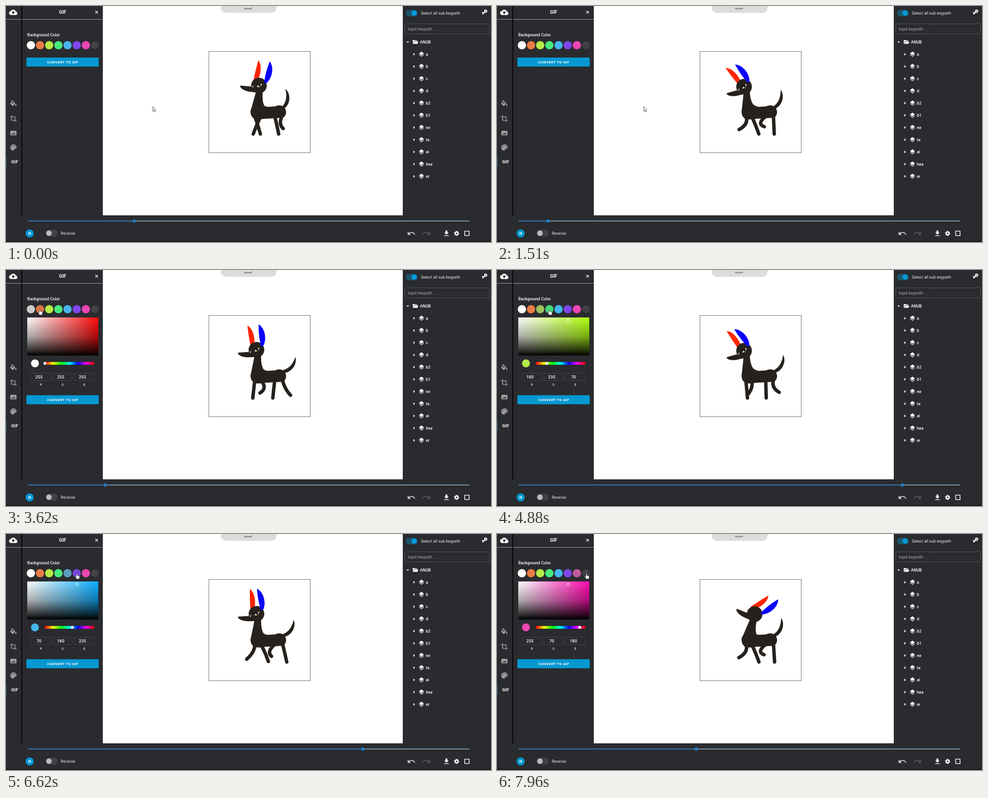
Animation, 1072 px wide and 522 px high, one loop 8 s. Source, as an HTML page:

```html
<!DOCTYPE html>
<html lang="en">
<head>
<meta charset="utf-8">
<title>Animation editor</title>
<style>
html, body { margin: 0; width: 100%; height: 100%; overflow: hidden; background: #2a2b2f; }
svg { display: block; width: 1072px; height: 522px; }
text { font: 9px Roboto, sans-serif; fill: #e6e6e6; }
.mid { text-anchor: middle; }
.bold { font-weight: 700; fill: #fff; }
.rows text, .medium { font-weight: 500; fill: #fff; }
.box { fill: none; stroke: #55575b; }
#fields .box { stroke: #424448; }
#legs path { fill: none; stroke: #26211d; stroke-width: 7.6; stroke-linecap: round; }
</style>
</head>
<body>
<svg viewBox="0 0 1072 522" xmlns="http://www.w3.org/2000/svg">
  <defs>
    <linearGradient id="tint"><stop stop-color="#fff"/><stop id="tintEnd" offset="1"/></linearGradient>
    <linearGradient id="shade" x2="0" y2="1">
      <stop stop-opacity="0"/><stop offset=".5" stop-opacity=".32"/><stop offset=".85" stop-opacity=".77"/><stop offset="1"/>
    </linearGradient>
    <linearGradient id="hues"></linearGradient>
  </defs>
  <rect width="1072" height="522" fill="#2a2b2f"/>
  <rect x="214" width="663" height="463" fill="#fff"/>
  <rect y="519" width="1072" height="3" fill="#211b20"/>
  <rect x="34" width="2" height="463" fill="#050505"/>
  <path d="M0 29.5H34M36 29.5H214" stroke="#a5a6a8"/>
  <path d="M475 0h123v2q0 13-13 13H488q-13 0-13-13z" fill="#dcdcdc"/>
  <path d="M526 4.5q9 4 18 0" fill="none" stroke="#8d8d8d" stroke-width="2.5"/>
  <rect x="448.5" y="100.5" width="224" height="224" fill="#fff" stroke="#666"/>

  <g id="icons"></g>
  <rect y="334" width="1" height="21" fill="#0a7fb0"/>
  <text x="11.5" y="347.5" class="bold" style="font-size:9.5px;letter-spacing:.4px">GIF</text>
  <text x="125" y="17" class="mid bold" style="font-size:10.3px">GIF</text>
  <path d="M197.5 11l5.5 5.5M203 11l-5.5 5.5" stroke="#fff" stroke-width="1.3"/>
  <text x="47" y="67" class="medium">Background Color</text>
  <g id="swatches"></g>

  <g id="picker">
    <rect x="47" y="105" width="157" height="84" fill="url(#tint)"/>
    <rect x="47" y="105" width="157" height="84" fill="url(#shade)"/>
    <circle id="marker" cx="157" cy="111.5" r="3.2" fill="none" stroke="#fff"/>
    <circle id="preview" cx="64" cy="206.5" r="8.7"/>
    <rect x="86" y="203.5" width="109" height="6" rx="1" fill="url(#hues)"/>
    <circle id="hueKnob" cy="206.5" r="3.3" fill="#f0f0f0"/>
    <g id="fields"></g>
  </g>
  <g id="convert">
    <rect x="45" y="114" width="160" height="20" rx="2" fill="#0398d1"/>
    <text x="125.3" y="126.8" class="mid bold" style="font-size:8px;letter-spacing:.5px">CONVERT TO GIF</text>
  </g>

  <rect x="884" y="8.5" width="26" height="14.5" rx="7.2" fill="#1f546c"/>
  <circle cx="902" cy="15.7" r="6" fill="#0599d8"/>
  <text x="917" y="18.7">Select all sub keypath</text>
  <rect x="881.5" y="39.5" width="187" height="22" rx="2" class="box"/>
  <text x="888" y="53.5" style="fill:#a9aaac">input keypath ...</text>
  <path d="M885 78.5h6l-3 3z" fill="#fff"/>
  <g id="rows" class="rows"><text x="915" y="83">ANUB</text></g>

  <path d="M48 475.5H1024" stroke="#93bfdf" stroke-width="1.5"/>
  <path id="played" stroke="#1b76bb" stroke-width="1.5"/>
  <circle id="knob" cy="475.5" r="3.5" fill="#1d80cf"/>
  <circle cx="52.3" cy="503" r="9" fill="#0398d1"/>
  <path d="M50.7 500v6M54 500v6" stroke="#fff" stroke-width="1.7"/>
  <rect x="87.5" y="495" width="27" height="15" rx="7.5" fill="#404245"/>
  <circle cx="95" cy="502.5" r="6" fill="#bfbfbf"/>
  <text x="121" y="505.5">Reverse</text>
  <circle cx="996" cy="503" r="3.1" fill="none" stroke="#fff" stroke-width="2.6"/>
  <circle cx="996" cy="503" r="4.8" fill="none" stroke="#fff" stroke-width="1.7" stroke-dasharray="2.5"/>
  <rect x="1013.8" y="498" width="9.7" height="9.7" rx=".5" fill="none" stroke="#fff" stroke-width="1.6"/>

  <g fill="#26211d">
    <path id="tail" d="M-3-2Q9-18 0-42C13-34 16-10 2 2z"/>
    <g id="legs"></g>
    <path d="M540.5 233C541 222 556 214 566 217.5C572 222 576 223 580 223L595 222C603 218 612 219 617 227C621 235 619 242 613 247C600 248 575 249 567 250C550 254 540 247 540.5 233z"/>
    <path id="neck"/>
    <g id="head">
      <path id="redEar" fill="#ff2500" d="M-4 4Q-3-20 0-43C10-34 11-14 4 4z"/>
      <circle r="17.3"/>
      <path d="M-41-1L-14 2 0 0-2 15Q-30 14-39 5-43 1-41-1z"/>
      <g id="eyes">
        <path d="M-5 2Q0-3 7-4Q6 2 1 3Q-3 4-5 2zM-16 3Q-15-1-12-2Q-11 2-13 4z" fill="#ead9bd"/>
        <circle cx="1.5" cy="-.5" r="2.5" fill="#0d0b0a"/>
        <circle cx="-13.3" cy="1" r="1.3" fill="#0d0b0a"/>
        <path d="M-6 0Q0-4 8-5M-17 1L-11-3" stroke="#0d0b0a" fill="none"/>
      </g>
      <path id="blueEar" fill="#0a00ff" d="M-1 0Q-4-22 0-50C13-40 14-15 4-2z"/>
    </g>
  </g>

  <path id="arrow" d="M0 0V10.5L2.4 8.3 4 11.7 5.6 11 4.1 7.6H6.8z" fill="#fff" stroke="#222" stroke-width=".8"/>
  <path id="hand" d="M-1 6V1a1 1 0 0 1 2 0V4l4 1q1.5.5 1.2 2L5.5 12H0L-3.5 7q.5-1.8 2.5 0z" fill="#fff" stroke="#222" stroke-width=".7"/>
</svg>
<script>
const LOOP = 8000, TICK = 79;
const SWATCH_GAP = 20.25;
// Playhead position, counted in whole runs, at a few ticks
const PLAYHEAD = [[0, .241], [19, 1.066], [35, 1.738], [46, 2.175], [62, 2.869], [84, 3.759], [101, 4.402]];
const LEGS = [
  { hip: [550, 244], x: 548, reach: 16, front: .8, lift: 10, liftAt: .17, bend: 1.5 },
  { hip: [563, 244], x: 563, reach: 17, front: .26, lift: 12, liftAt: .48, bend: 1.5 },
  { hip: [594, 244], x: 596, reach: 11, front: .87, lift: 16, liftAt: .2, bend: -1.2 },
  { hip: [611, 242], x: 614, reach: 16, front: .46, lift: 14, liftAt: .66, bend: -.9 }
];

const $ = id => document.getElementById(id);
const set = (el, attrs) => { for (const k in attrs) el.setAttribute(k, attrs[k]); return el; };
const add = (parent, tag, attrs, text = '') => {
  const el = document.createElementNS('http://www.w3.org/2000/svg', tag);
  el.textContent = text;
  return parent.appendChild(set(el, attrs));
};
const show = (el, on) => set(el, { visibility: on ? 'visible' : 'hidden' });
const turn = phase => Math.cos(2 * Math.PI * phase);
const ease = u => { u = Math.min(1, Math.max(0, u)); return u * u * (3 - 2 * u); };

function playheadAt(tick) {
  const i = Math.max(1, PLAYHEAD.findIndex(([n]) => n >= tick));
  const [[n0, p0], [n1, p1]] = [PLAYHEAD[i - 1], PLAYHEAD[i]];
  return (p0 + (p1 - p0) * (tick - n0) / (n1 - n0)) % 1;
}

// Swatch colours: white, then evenly spaced hues of one brightness
const hueOf = i => i ? 60 * i - 40 : 0;
const colorOf = i => [5, 3, 1].map(n => {
  const k = (n + hueOf(i) / 60) % 6;
  return i ? Math.round(235 - 165 * Math.max(0, Math.min(k, 4 - k, 1))) : 255;
});
const pickTime = i => 3020 + 735 * i;

// Icons on a 24-unit grid, centred at x, y
const icon = (d, x, y, size, fill = '#fff', extra = '') => add($('icons'), 'path', {
  d, fill, 'fill-rule': 'evenodd',
  transform: `translate(${x} ${y}) scale(${size / 24}) ${extra} translate(-12 -12)`
});
const toolIcon = (d, y, size) => set(icon(d, 16.3, y, size, '#a0a0a1'), { stroke: '#a0a0a1', 'stroke-width': .7 });
const dot = (x, y) => `M${x - 1.5} ${y}a1.5 1.5 0 0 0 3 0a1.5 1.5 0 0 0-3 0`;
const UNDO = 'M12.5 8c-2.6 0-5 1-6.9 2.6L2 7v9h9l-3.6-3.6c1.4-1.2 3.2-1.9 5.1-1.9 3.5 0 6.5 2.3 7.6 5.5l2.4-.8C21 11 17 8 12.5 8z';
const LAYERS = 'M12 18.5L4.6 12.8 3 14.1l9 7 9-7-1.6-1.3zM12 16l9-7-9-7-9 7z';
icon('M19.3 10A7.5 7.5 0 0 0 5.3 8 6 6 0 0 0 6 20H19a5 5 0 0 0 .3-10zM14 13v4h-4v-4H7l5-5 5 5z', 16, 14, 18);
toolIcon('M16.6 8.9L7.6 0 6.2 1.4l2.4 2.4-5.2 5.1a1.5 1.5 0 0 0 0 2.2l5.5 5.5a1.5 1.5 0 0 0 2.2 0l5.5-5.5a1.5 1.5 0 0 0 0-2.2zM5.2 10L10 5.2 14.8 10zM19 11.5s-2 2.2-2 3.5a2 2 0 0 0 4 0c0-1.3-2-3.5-2-3.5z', 217, 18);
toolIcon('M17 15h2V7a2 2 0 0 0-2-2H9v2h8zM7 17V1H5v4H1v2h4v10a2 2 0 0 0 2 2h10v4h2v-4h4v-2z', 249, 15.5);
toolIcon('M21 4H3a2 2 0 0 0-2 2v12a2 2 0 0 0 2 2h18a2 2 0 0 0 2-2V6a2 2 0 0 0-2-2zM4 17l4-5 3 3 4-5 5 7z', 281, 14.5);
toolIcon('M12 3a9 9 0 0 0 0 18c1.3 0 2-1.5 1.1-2.5-.9-1-.2-2.5 1.1-2.5H16a5 5 0 0 0 5-5c0-4.4-4-8-9-8z'
  + dot(6.5, 10.5) + dot(9.5, 6.5) + dot(14.5, 6.5) + dot(17.5, 10.5), 313, 18);
icon('M12.6 10A6 6 0 1 0 12.6 14H17v4h4v-4h2v-4zM7 14a2 2 0 1 1 0-4 2 2 0 0 1 0 4z', 1058, 13.5, 14.5, '#fff', 'rotate(135)');
icon('M1 20V4h7l2 2h9v3H6L2 20zM3 20L7 10.5h17L20 20z', 905, 79.5, 13);
icon(UNDO, 896, 503, 20, '#c9c9ca');
icon(UNDO, 929, 503, 20, '#525457', 'scale(-1 1)');
icon('M19 9h-4V3H9v6H5l7 7 7-7zM5 18v2h14v-2z', 973.5, 503, 17);
['a', 'b', 'c', 'd', 'b2', 'b1', 'ne', 'ta', 'el', 'hea', 'er'].forEach((name, i) => {
  const y = 106.7 + 27 * i;
  add($('rows'), 'path', { d: `M900.5 ${y - 3}l3.5 3-3.5 3z`, fill: '#fff' });
  icon(LAYERS, 918.3, y, 14.5);
  add($('rows'), 'text', { x: 928, y: y + 3.2 }, name);
});

const swatches = Array.from({ length: 7 }, (_, i) =>
  add($('swatches'), 'circle', { cx: 55 + SWATCH_GAP * i, cy: 86.7, r: 9.2 }));
add($('swatches'), 'circle', { cx: 196.5, cy: 86.7, r: 8.5, fill: '#404245' });
for (let i = 0; i <= 6; i++) add($('hues'), 'stop', { offset: i / 6, 'stop-color': `hsl(${i * 60} 100% 50%)` });
const values = ['R', 'G', 'B'].map((label, i) => {
  const x = 77 + 48 * i;
  add($('fields'), 'rect', { x: x - 21.5, y: 228.5, width: 43, height: 16, rx: 1.5, class: 'box' });
  add($('fields'), 'text', { x, y: 255.8, class: 'mid', style: 'font-size:6.5px;font-weight:500' }, label);
  return add($('fields'), 'text', { x: x - 4, y: 239.8, class: 'mid medium', style: 'font-size:9.3px' });
});
for (const leg of LEGS) leg.el = add($('legs'), 'path', {});

function drawLeg({ hip, x, reach, front, lift, liftAt, bend, el }, stride) {
  const raise = lift * Math.max(0, turn(stride - liftAt)) ** 2;
  const footX = x + reach * turn(stride - front), footY = 283 - raise;
  const kneeX = (hip[0] + footX) / 2 + bend * raise;
  set(el, { d: `M${hip}Q${kneeX} 261 ${footX} ${footY}` });
}

function drawDog(p) {
  const stride = p * 3 % 1;
  const tilt = -4.6 + 21.5 * turn(p - .4675);
  const red = 4 + 54.6 * turn(p - .478), blue = 3.3 + 50.7 * turn(p - .46);
  const x = 560 + .63 * tilt, y = 176 + .005 * tilt * tilt;
  const a = tilt * Math.PI / 180, c = Math.cos(a), s = Math.sin(a);
  const at = (u, v) => `${x + u * c - v * s} ${y + u * s + v * c}`;
  set($('head'), { transform: `translate(${x} ${y}) rotate(${tilt})` });
  set($('redEar'), { transform: `translate(-7.5 -13.5) rotate(${red - tilt})` });
  set($('blueEar'), { transform: `translate(12.5 -4.5) rotate(${blue - tilt})` });
  show($('eyes'), p < .32 || p > .62);
  set($('neck'), { d: `M${at(-7, 8)}L${at(-7, 14)}L541 231L576 226Q${565 + (x - 559) * .4} 219 ${at(8, 14)}L${at(8, 8)}z` });
  set($('tail'), { transform: `translate(613 225) rotate(${15 + 30 * turn(stride - .425)})` });
  LEGS.forEach(leg => drawLeg(leg, stride));
}

// The pointer leaves its rest, waits beside the swatches, then steps along them
function pointerAt(t) {
  const approach = ease((t - 1820) / 680), enter = ease((t - 2780) / 150);
  let x = 324.5 - 283.5 * approach + 13 * enter;
  for (let i = 0; i < 7; i++) x += 20.5 * ease((t - pickTime(i) - 50) / 300);
  return [x, 222.5 - 139.5 * approach + 4.5 * enter];
}

function drawPanel(t) {
  const active = Math.floor((t - pickTime(0)) / 735);
  const open = active >= 0;
  const [x, y] = pointerAt(t);
  const hover = y < 100 && x > 45 ? Math.round((x - 54) / SWATCH_GAP) : -1;
  swatches.forEach((el, i) => {
    const color = colorOf(i);
    set(el, {
      fill: `rgb(${i === active ? color.map(v => 50 + .6 * v) : color})`,
      opacity: i === hover && i !== active ? .9 : 1
    });
  });
  show($('picker'), open);
  set($('convert'), { transform: `translate(0 ${open ? 163 : 0})` });
  if (open) {
    const color = colorOf(active), hue = hueOf(active);
    set($('tintEnd'), { 'stop-color': `hsl(${hue} 100% 52%)` });
    set($('marker'), { opacity: active ? 1 : 0 });
    set($('preview'), { fill: `rgb(${color})` });
    set($('hueKnob'), { cx: 86 + 109 * hue / 360 });
    values.forEach((el, i) => { el.textContent = color[i]; });
  }
  const transform = `translate(${x} ${y})`;
  show(set($('arrow'), { transform }), hover < 0);
  show(set($('hand'), { transform }), hover >= 0);
}

function draw(time) {
  const tick = Math.round(time % LOOP / TICK);
  const p = playheadAt(tick);
  const x = 48 + 976 * p;
  set($('played'), { d: `M48 475.5H${x}` });
  set($('knob'), { cx: x });
  drawDog(p);
  drawPanel(tick * TICK);
}

const start = performance.now();
function loop() {
  draw(performance.now() - start);
  requestAnimationFrame(loop);
}
loop();
</script>
</body>
</html>
```
